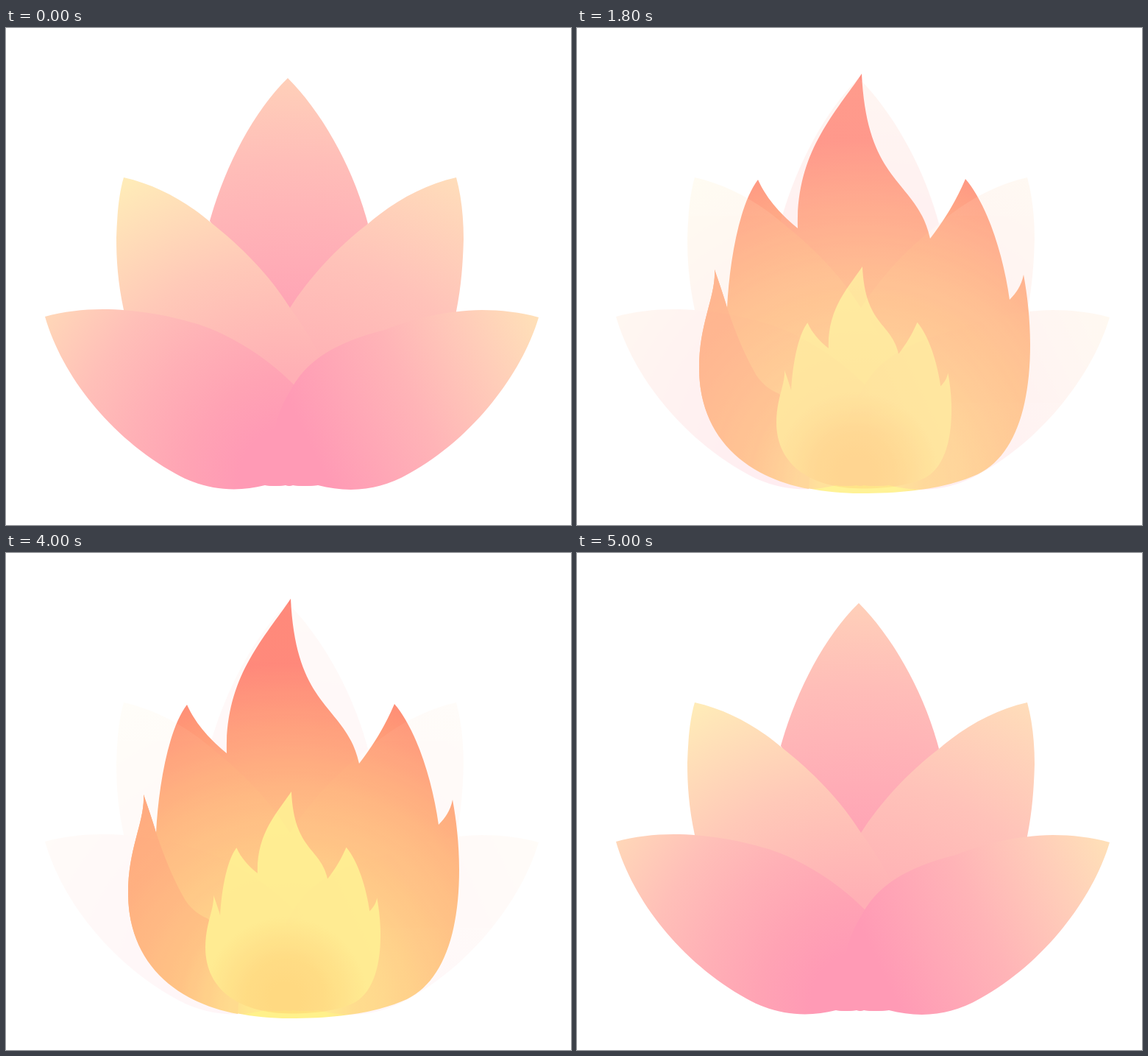
Animation, 768 px wide and 675 px high, one loop 5100 ms. Source, as an HTML page:

```html
<!DOCTYPE html>
<html lang="en">
<head>
<meta charset="utf-8">
<title>Lotus and flame</title>
<style>
  html, body { margin: 0; width: 100%; height: 100%; overflow: hidden; background: #fff; }
  svg { display: block; width: 100%; height: 100%; }
</style>
</head>
<body>
<svg viewBox="0 0 768 675">
  <defs id="gradients">
    <linearGradient id="rightFront" gradientUnits="userSpaceOnUse" x1="390" y1="570" x2="728" y2="408">
      <stop offset=".06" stop-color="#ff9ab5"/>
      <stop offset=".47" stop-color="#ffb4b7"/>
      <stop offset=".77" stop-color="#ffcdb9"/>
      <stop offset="1" stop-color="#ffe0b8"/>
    </linearGradient>
    <path id="flame" d="M387 62 C350 117 297 170 300 272 C278 254 258 233 246 206
      C220 240 207 320 204 380 C200 365 192 343 187 328 C189 365 166 400 166 462
      C166 575 260 632 385 632 C460 632 510 622 545 606 C592 583 616 520 616 430
      C616 395 612 362 607 335 C604 350 597 360 588 369 C580 310 558 240 528 205
      C515 235 500 260 480 286 C462 205 394 215 387 62Z"/>
  </defs>

  <g id="fire">
    <use href="#flame" fill="url(#outerFlame)"/>
    <path fill="url(#sideFlame)" d="M187 328 C189 365 166 400 166 462 C166 555 228 610 315 626
      L320 560 L275 497 Q251 487 240 465 Q222 433 204 380 C200 365 192 343 187 328Z"/>
    <use href="#flame" fill="url(#innerFlame)" transform="translate(183.2 291.2) scale(.529)"/>
  </g>

  <g id="lotus">
    <path fill="url(#middle)" d="M383 68 C335 115 297 190 277 262 L386 420 L492 266 C472 190 430 115 383 68Z"/>
    <path fill="url(#rightBack)" d="M612 203 C568 213 528 235 492 266 C450 298 413 338 386 380
      L386 500 L600 480 L612 385 C619 350 621 320 622 287 C622 258 619 228 612 203Z"/>
    <path fill="url(#leftBack)" d="M160 203 C205 213 245 236 277 263 C320 297 358 335 386 380
      Q412 415 432 455 L432 520 L200 520 L160 383 C152 345 150 315 150 285 C151 255 153 227 160 203Z"/>
    <path fill="url(#leftFront)" d="M53 392 C78 385 105 382 131 382 C185 382 240 394 277 408
      C325 428 362 455 392 485 L424 621 Q404 623 390 621 L385 622 L380 621 Q365 623 352 621
      C313 631 270 628 230 605 C145 558 77 475 53 392Z"/>
    <path fill="url(#rightFront)" d="M724 393 C700 386 672 383 647 383 C597 384 555 394 515 410
      C470 422 415 440 388 490 Q377 507 370 527 C360 560 355 600 352 621 Q365 623 380 621
      L385 622 L390 621 Q404 623 424 621 C463 631 505 630 548 605 C630 560 700 474 724 393Z"/>
  </g>
</svg>
<script>
const byId = id => document.getElementById(id);

// Each radial fill: centre, then [radius, colour] stops.
const radialFills = {
  outerFlame: [385, 620, [50, '#fff07f'], [85, '#ffe27f'], [130, '#ffda7e'], [200, '#ffc878'],
    [290, '#ffb372'], [350, '#ffa06e'], [410, '#ff8c69'], [470, '#ff7767']],
  sideFlame: [385, 620, [80, '#ffe07f'], [150, '#ffc275'], [260, '#ffaa70'], [340, '#ff9f6e']],
  innerFlame: [372, 593, [40, '#ffde70'], [100, '#ffe174'], [210, '#fff284']],
  middle: [388, 612, [230, '#ffa4b5'], [430, '#ffbdb8'], [540, '#ffcfb9']],
  leftBack: [388, 612, [140, '#ffafb5'], [300, '#ffc9b8'], [460, '#ffebb8']],
  rightBack: [388, 612, [150, '#ffb1b5'], [300, '#ffc2b9'], [465, '#ffddba']],
  leftFront: [388, 612, [70, '#ff9ab5'], [140, '#ffa3b4'], [220, '#ffb0b6'], [300, '#ffbfb8'], [400, '#ffd7b8']],
};

byId('gradients').innerHTML += Object.entries(radialFills).map(([id, [cx, cy, ...stops]]) => {
  const radius = stops.at(-1)[0];
  const stopTags = stops.map(([r, colour]) => `<stop offset="${r / radius}" stop-color="${colour}"/>`);
  return `<radialGradient id="${id}" gradientUnits="userSpaceOnUse" cx="${cx}" cy="${cy}" r="${radius}">${stopTags.join('')}</radialGradient>`;
}).join('');

const LOOP = 5100, STEP = 100, STEPS = 11;
const clamp = n => Math.max(0, Math.min(STEPS, n));

function draw(now) {
  const t = now % LOOP;
  const step = t < 4000
    ? clamp(Math.floor((t - 1000) / STEP) + 1)
    : clamp(STEPS - 1 - Math.floor((t - 4000) / STEP));
  const heat = step / STEPS;
  byId('fire').setAttribute('opacity', heat);
  byId('lotus').setAttribute('opacity', 1 - heat);
}

const start = performance.now();
function tick() {
  draw(performance.now() - start);
  requestAnimationFrame(tick);
}
tick();
</script>
</body>
</html>
```
